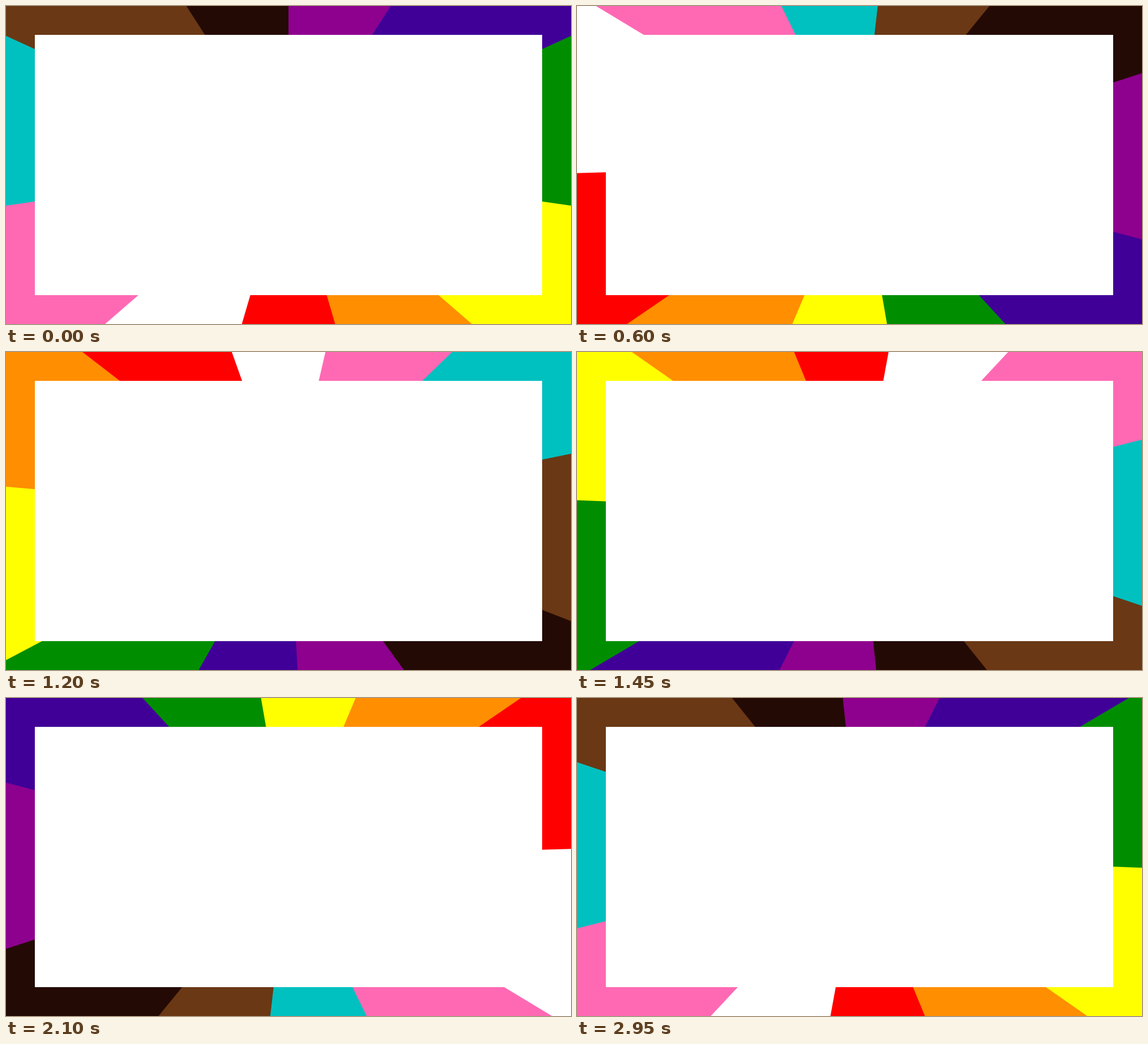
An HTML page with a canvas that plays this animation: 960 px wide and 540 px high, repeating every 3 s.

```html
<!DOCTYPE html>
<html lang="en">
<head>
<meta charset="utf-8">
<title>Spinning colour rays</title>
<style>
  html, body { margin: 0; width: 100%; height: 100%; overflow: hidden; background: #fff; }
  canvas { display: block; width: 960px; height: 540px; }
</style>
</head>
<body>
<canvas id="stage" width="960" height="540"></canvas>
<script>
  const W = 960, H = 540, BORDER = 49;
  const LOOP = 3000, STEP = 50;

  // Clockwise, starting at twelve o'clock.
  const COLORS = [
    '#8e008e', '#400098', '#008e00', '#ffff00', '#ff8e00', '#ff0000',
    '#ffffff', '#ff69b4', '#00c0c0', '#6a3815', '#240a04'
  ];
  const SECTOR = 2 * Math.PI / COLORS.length;
  const RADIUS = 800;
  const ctx = document.getElementById('stage').getContext('2d');

  function wedge(color, from, to) {
    ctx.fillStyle = color;
    ctx.beginPath();
    ctx.moveTo(0, 0);
    ctx.arc(0, 0, RADIUS, from, to);
    ctx.fill();
  }

  function draw(time) {
    const turn = Math.floor((time % LOOP) / STEP) * STEP / LOOP * 2 * Math.PI;

    ctx.fillStyle = COLORS[0];
    ctx.fillRect(0, 0, W, H);

    ctx.save();
    ctx.translate(W / 2, H / 2);
    ctx.rotate(turn - Math.PI / 2);
    // Each wedge runs under the next one, so no seams show.
    for (let i = 1; i < COLORS.length; i++) {
      wedge(COLORS[i], i * SECTOR, Math.min(i + 1.5, COLORS.length) * SECTOR);
    }
    ctx.restore();

    ctx.fillStyle = '#fff';
    ctx.fillRect(BORDER, BORDER, W - 2 * BORDER, H - 2 * BORDER);
  }

  const start = performance.now();
  function tick() {
    draw(performance.now() - start);
    requestAnimationFrame(tick);
  }
  tick();
</script>
</body>
</html>
```
